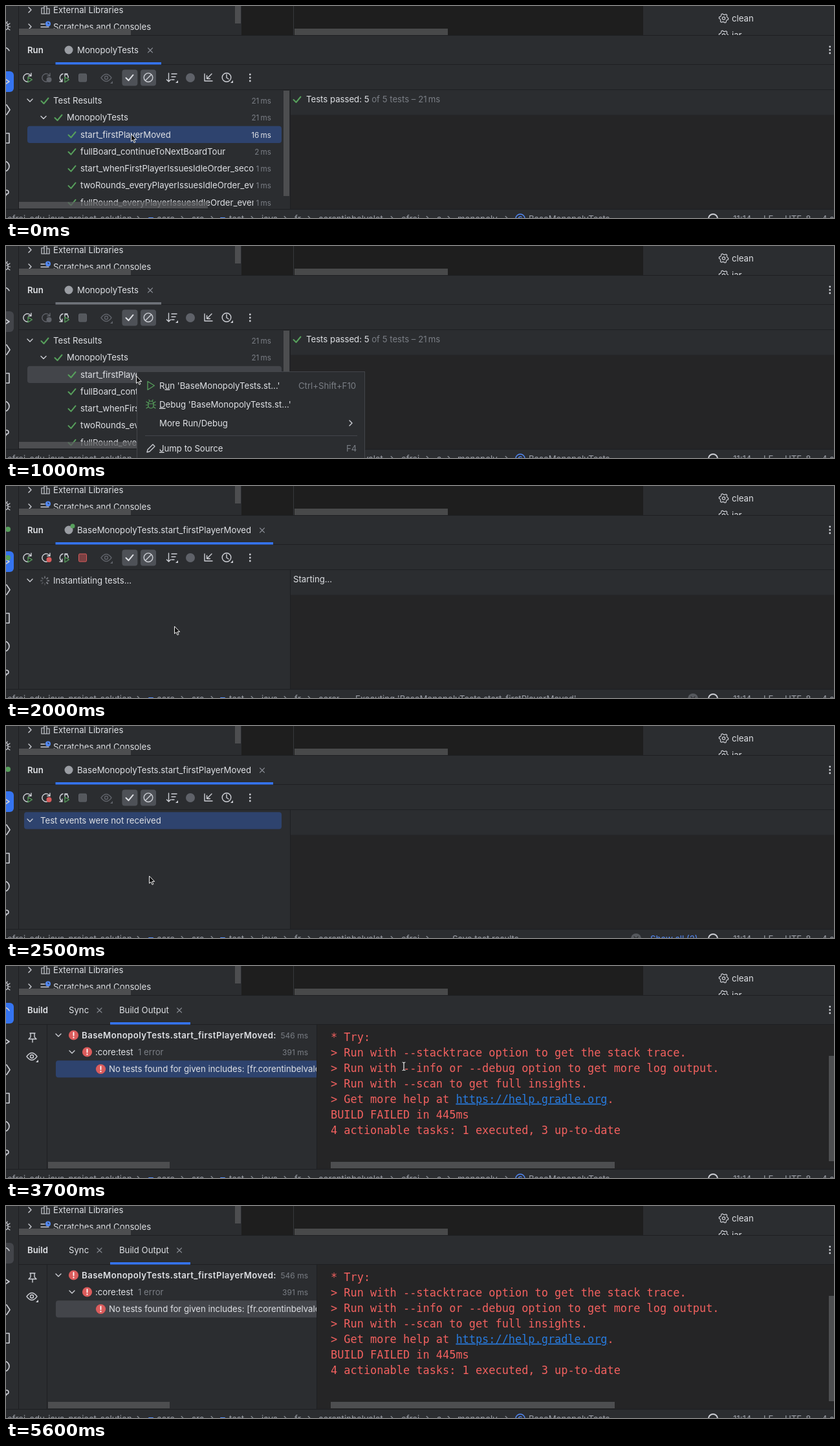
Recreate the animation shown at these times as an HTML page. Size 1280 px wide and 328 px high, loop 5700 ms.

```html
<!DOCTYPE html>
<html lang="en">
<head>
<meta charset="utf-8">
<title>Test run</title>
<style>
html, body { margin: 0; width: 100%; height: 100%; overflow: hidden; background: #2b2d30; }
svg { display: block; }
text { font: 13.18px Inter, Roboto, sans-serif; fill: #dfe1e5; white-space: pre; }
.bold { font-weight: 600; }
.wide { letter-spacing: .45px; }
.dim { fill: #7a7e85; }
.crumb { fill: #9da0a8; }
.time { font-size: 11.7px; word-spacing: -1px; text-anchor: end; }
.total { font-size: 12px; text-anchor: end; }
.log { font: 16.92px "DejaVu Sans Mono", "Noto Sans Mono", monospace; fill: #f2615f; }
.link { fill: #287bde; text-decoration: underline; }
.u { text-decoration: underline; }
</style>
</head>
<body>
<svg id="stage" width="1280" height="328" viewBox="0 0 1280 328"></svg>
<script>
const LOOP = 5700, STEP = 100;
const BG = '#2b2d30', DARK = '#1e1f22', EDITOR = '#1e1e1e', CONSOLE = '#252526', BAR = '#4d4e50';
const INK = '#ced0d6', DIM = '#5f6269', BLUE = '#3574f0', GREEN = '#57a05c', RED = '#db5c5c';
const SELECT = '#2e436e', MUTED = '#43454a';

// [time, x, y, shape]
const POINTER = [
  [0, 193, 198], [500, 194, 199], [600, 197, 200], [700, 200, 201], [800, 201, 201],
  [1200, 204, 203], [1300, 222, 208], [1400, 245, 214], [1500, 257, 217], [1600, 260, 217],
  [2200, 257, 219], [2300, 238, 228], [2400, 221, 232],
  [3300, 208, 221], [3400, 350, 200], [3500, 575, 172, 'beam'], [3600, 673, 161, 'beam'],
  [3700, 615, 155, 'beam'], [3800, 442, 140], [3900, 325, 119], [4000, 202, 95],
  [4100, 112, 75], [4200, 68, 64], [4300, 55, 61], [4600, 45, 24], [4700, 31, -11],
  [4900, 31, -12], [5000, 31, -40]
];

const rect = (x, y, w, h, fill, r = 0) => `<rect x="${x}" y="${y}" width="${w}" height="${h}" rx="${r}" fill="${fill}"/>`;
const path = (d, color = INK, w = 1.4, fill = 'none') =>
  `<path d="${d}" fill="${fill}" stroke="${color}" stroke-width="${w}" stroke-linecap="round" stroke-linejoin="round"/>`;
const dot = (x, y, r, fill) => `<circle cx="${x}" cy="${y}" r="${r}" fill="${fill}"/>`;
const ring = (x, y, r, color = INK, w = 1.4) => `<circle cx="${x}" cy="${y}" r="${r}" fill="none" stroke="${color}" stroke-width="${w}"/>`;
const text = (x, y, s, cls = '') => `<text x="${x}" y="${y + 4.7}" class="${cls}">${s}</text>`;
const clip = (x, y, w, h, body) => `<svg x="${x}" y="${y}" width="${w}" height="${h}" viewBox="${x} ${y} ${w} ${h}">${body}</svg>`;

const down = (x, y) => path(`M${x - 4} ${y - 2}l4 4 4-4`);
const right = (x, y, c = INK, s = 4) => path(`M${x - s / 2} ${y - s}l${s} ${s} ${-s} ${s}`, c);
const close = (x, y) => path(`M${x - 3.5} ${y - 3.5}l7 7m0-7l-7 7`, '#868a91', 1.1);
const check = (x, y, c = GREEN) => path(`M${x - 5.5} ${y + .5}l4 4 7-8.5`, c, 2);
const kebab = (x, y) => [-5, 0, 5].map(d => dot(x, y + d, 1.4, INK)).join('');
const corner = (x, y, c = INK) => `<path d="M${x} ${y}v-4l-4 4z" fill="${c}"/>`;
const play = (x, y, s, fill = 'none') => path(`M${x} ${y - s}l${s * 1.6} ${s}l${-s * 1.6} ${s}z`, GREEN, 1.3, fill);
const reload = (x, y, c = INK) => path(`M${x + 5.5} ${y - 3}a6.2 6.2 0 1 0-4 9M${x + 6} ${y - 7}v4.2h-4.2`, c);
const eye = (x, y, c) => path(`M${x - 8} ${y}q8-11 16 0q-8 11-16 0z`, c) + ring(x, y, 2.5, c) + corner(x + 10, y + 9, c);
const alert = (x, y) => dot(x, y, 7.6, RED) + path(`M${x} ${y - 4}v4.5`, '#fff', 1.8) + dot(x, y + 3.7, 1.1, '#fff');
const underline = (x, w, color) => rect(20, 90, 1260, 1, DARK) + rect(x, 87, w, 3.6, color);
const row = (x, y, w, color) => rect(x, y - 13.2, w, 26.2, color, 4);

function gear(x, y) {
  const pts = Array.from({ length: 24 }, (_, i) => {
    const a = i * Math.PI / 12, r = i % 4 < 2 ? 7.2 : 5.6;
    return (x + r * Math.cos(a)).toFixed(1) + ' ' + (y + r * Math.sin(a)).toFixed(1);
  });
  return path(`M${pts.join('L')}z`, INK, 1.2) + ring(x, y, 2.2, INK, 1.2);
}

function bug(x, y, c) {
  return path(`M${x - 4} ${y - 1}a4 4 0 0 1 8 0v3a4 4 0 0 1-8 0zM${x - 4} ${y - 1}h8` +
    `M${x - 4} ${y - 2}l-3-2M${x + 4} ${y - 2}l3-2M${x - 4} ${y + 1}h-3.5M${x + 4} ${y + 1}h3.5` +
    `M${x - 4} ${y + 4}l-3 2M${x + 4} ${y + 4}l3 2M${x - 2} ${y - 5}l-1-2M${x + 2} ${y - 5}l1-2`, c, 1.2);
}

function spinner(x, y, n) {
  let out = '';
  for (let i = 0; i < 8; i++) {
    const o = .25 + .6 * ((i - n % 8 + 8) % 8) / 7;
    out += `<path d="M0-3.5V-7" transform="translate(${x} ${y}) rotate(${i * 45})" stroke="#9da0a8" stroke-width="1.7" opacity="${o}"/>`;
  }
  return out;
}

function topStrip() {
  return rect(0, 0, 1280, 328, BG) +
    right(37, 6) + path('M55 12v-9h4v9zM59 12v-12h4v12zM63 12v-8h4v8z', INK, 1.2) + text(73, 6, 'External Libraries') +
    right(37, 32) + path('M54 28h6M54 32.500h12M54 37h12') + dot(65, 27.500, 4, '#548af7') +
    path('M65 25.500v2h1.500', BG, 1) + text(73, 32, 'Scratches and Consoles') +
    rect(354, 0, 9, 27, BAR) + rect(20, 35, 173, 10, BAR) +
    rect(364, 0, 621, 45, EDITOR) + rect(444, 0, 1, 45, '#36383c') + rect(446, 35, 237, 10, '#48494a') +
    gear(1109.5, 19) + text(1122, 19.5, 'clean') + gear(1109.5, 45) + text(1122, 45, 'jar') +
    rect(20, 45, 1260, 283, BG) + rect(20, 45, 1260, 1, DARK) + kebab(1273.7, 68);
}

function stripe(s) {
  const tile = s.focus ? BLUE : MUTED, y = s.build ? 57 : 101;
  const running = s.view === 'start';
  return rect(0, 0, 20, 328, BG) + rect(19, 0, 1, 328, DARK) + rect(-20, y, 32, 32, tile, 6) +
    bug(-1, 31, INK) + path('M-4 65q5-2 9 4', INK, 1.6) + path('M-4 111l9 6-9 6', INK, 1.6) +
    path('M-4 153h5l5 7.500-5 7.500h-5', INK, 1.6) + path('M-6 197h11v15h-11', INK, 1.6) +
    ring(-3, 248, 8, INK, 1.6) + ring(1, 288, 3, INK, 1.6) + path('M1 291q0 3-5 4', INK, 1.6) +
    (running || s.view === 'none' ? dot(3, 67, 4, GREEN) : '') + (running ? dot(3, 111, 4, GREEN) : '');
}

function toolbar(s) {
  const live = s.view === 'start', fresh = s.view !== 'old';
  return reload(33, 111) + play(34, 114, 4, BG) +
    reload(62, 111, fresh ? INK : DIM) + dot(66.500, 114, 4, fresh ? RED : DIM) +
    path('M88 105a6 6 0 0 0-3 10l2 2M83 117h4v-4M91 105q6 1 5 6M95 105h-4v4') + play(91, 114, 4, BG) +
    `<rect x="112.500" y="105" width="12" height="12" rx="1.500" fill="${live ? '#7a4042' : '#55585d'}" stroke="${live ? RED : DIM}"/>` +
    eye(155, 111, DIM) +
    rect(179.4, 98.4, 24, 25, '#4e5157', 4) + check(191, 110.7, '#dfe1e5') +
    rect(208, 98.4, 24, 25, '#4e5157', 4) + ring(220, 110.7, 6.8) + path('M224.500 106.200l-9 9') +
    path('M251.500 104v13M248.500 114l3 3 3-3M256 105h8M256 109.500h6M256 114h4') + corner(266, 119) +
    dot(285, 111, 7, DIM) +
    path('M307 105v11h12M318 105l-7.500 7.500M310.500 107.500v5h5') +
    ring(341, 110.500, 6.8) + path('M341 106v5l3 2') + corner(351, 119) + kebab(377.3, 111) +
    rect(20, 129, 1260, 1, DARK);
}

function tab(label, end, s) {
  return text(33, 68, 'Run', 'bold') + dot(97, 68, 6.5, '#9a9da3') + (s.view === 'start' ? dot(103, 62, 3.5, GREEN) : '') +
    text(110, 68, label) + close(end - 17, 68.5) + underline(76.5, end - 76.5, s.focus ? BLUE : '#6f737a');
}

function tests(s) {
  const rows = [
    ['start_firstPlayerMoved', 16], ['fullBoard_continueToNextBoardTour', 2],
    ['start_whenFirstPlayerIssuesIdleOrder_secondPlayerMoved', 1],
    ['twoRounds_everyPlayerIssuesIdleOrder_everyPlayerMoved', 1],
    ['fullRound_everyPlayerIssuesIdleOrder_everyPlayerMoved', 1]
  ];
  const list = rows.map(([name, ms], i) => {
    const y = 199 + i * 26.2;
    return check(102, y) + clip(110, y - 13, 272.5, 26, text(115, y, name)) +
      text(410, y, ms + ' ms', i ? 'time dim' : 'time');
  }).join('');
  return row(33, 199, 393, s.focus ? SELECT : MUTED) +
    down(37, 146) + check(60, 146.5) + text(73, 146.5, 'Test Results') + text(410, 146.5, '21 ms', 'time dim') +
    down(58, 172.5) + check(81, 172.5) + text(94, 172.5, 'MonopolyTests') + text(410, 172.5, '21 ms', 'time dim') +
    clip(20, 130, 419, 184, list) +
    rect(429, 131, 9, 163, BAR) + `<g opacity=".75">${rect(20, 303, 292, 10, '#595a5c')}</g>` +
    check(450, 144.5) + text(464, 144.5, 'Tests passed: 5 <tspan class="dim">of 5 tests – 21<tspan dx="-1.5"> ms</tspan></tspan>');
}

function runPanel(s, n) {
  const old = s.view === 'old';
  let out = tab(old ? 'MonopolyTests' : 'BaseMonopolyTests.start_firstPlayerMoved', old ? 240 : 413, s) +
    toolbar(s) + rect(439, 130, 1, 184, DARK) + rect(440, 168.5, 840, 145.5, CONSOLE);
  if (old) out += tests(s);
  else if (s.view === 'start')
    out += down(37, 146) + spinner(60, 146.5, n) + text(73, 146.5, 'Instantiating tests...') + text(444, 144.5, 'Starting...');
  else out += row(28, 146.5, 398, SELECT) + down(37, 146) + text(53, 146.5, 'Test events were not received');
  return out;
}

function buildPanel(s) {
  const log = [
    '* Try:',
    '&gt; Run with --stacktrace option to get the stack trace.',
    '&gt; Run with --info or --debug option to get more log output.',
    '&gt; Run with --scan to get full insights.',
    '&gt; Get more help at <tspan class="link">https://help.gradle.org</tspan>.',
    'BUILD FAILED in 445ms',
    '4 actionable tasks: 1 executed, 3 up-to-date'
  ];
  const fail = 'No tests found for given includes: [fr.corentinbelvalet.efrei.a.monopoly.BaseMonopolyTests]';
  return text(33, 68, 'Build', 'bold') + text(97, 68, 'Sync') + close(144.5, 68.5) +
    text(175, 68, 'Build Output') + close(268, 68.5) +
    underline(161, 124, BLUE) + rect(63, 91, 1, 223, DARK) +
    path('M37 104h8M38 104v6l-3 3h12l-3-3v-6M41 113v5') + eye(40, 140, INK) +
    rect(480, 91, 800, 223, CONSOLE) + rect(480, 91, 1, 223, DARK) +
    clip(64, 91, 416, 223,
      row(77, 159.5, 420, s.focus ? SELECT : MUTED) +
      down(81, 107) + alert(104.5, 107) + text(117, 107, 'BaseMonopolyTests.start_firstPlayerMoved:', 'bold wide') +
      down(102, 133) + alert(125.5, 133) + text(138, 133.5, ':core:test') + text(204, 133.5, '1 error', 'dim') +
      alert(146.5, 159.5) + text(159, 159.5, fail) +
      text(467, 107, '546 ms', 'total dim') + text(467, 133.5, '391 ms', 'total dim') +
      rect(65, 303, 188, 10, BAR)) +
    log.map((line, i) => text(502, 111 + i * 24, line, 'log')).join('') +
    rect(502, 303, 439, 10, BAR) + rect(1272, 139, 8, 163, BAR);
}

function status(job) {
  const crumbs = [[2, 'efrei-edu-java-project-solution'], [233, 'core'], [287, 'src'], [345, 'test'], [395, 'java'],
    [446, 'fr'], [483, 'corentinbelvalet'], [611, 'efrei'], [666, 'a'], [698, 'monopoly'], [808, 'BaseMonopolyTests']];
  const arrows = [205, 273, 319, 381, 432, 469, 597, 652, 685, 774];
  const trail = crumbs.map(([x, s]) => text(x, 329, s, 'crumb')).join('') +
    arrows.map(x => right(x, 329, '#868a91', 3.5)).join('') +
    [224, 335].map(x => rect(x - 4, 327, 8, 6, '#548af7', 1)).join('') +
    ring(795, 329, 7, '#548af7') + path('M797 326.500a3 3 0 1 0 0 5', '#548af7');
  const stop = x => dot(x, 329, 8, '#55585d') + path(`M${x - 3} 326l6 6m0-6l-6 6`, BG);
  const limit = job === 'exec' ? 515 : job === 'save' ? 656 : 1060;
  let out = rect(0, 314, 1280, 14, BG) + rect(0, 314, 1280, 1, DARK) + clip(0, 314, limit, 14, trail);
  if (job === 'exec') out += text(540, 329, "Executing 'BaseMonopolyTests.start_firstPlayerMoved'", 'crumb') + stop(1062);
  if (job === 'save') out += text(690, 329, 'Save test results', 'crumb') + stop(974) +
    text(996, 329, '<tspan fill="#548af7">Show all (2)</tspan>');
  return out + ring(1093, 329, 7, INK, 2) + text(1124, 329, '11:14', 'crumb') + text(1171, 329, 'LF', 'crumb') +
    text(1204, 329, 'UTF-8', 'crumb') + text(1261, 329, '4 spaces', 'crumb');
}

function menu(hover) {
  const u = c => `<tspan class="u">${c}</tspan>`;
  return `<rect x="202.500" y="194.500" width="352" height="150" fill="${BG}" stroke="${MUTED}"/>` +
    (hover ? rect(208, 202, 341, 27, SELECT, 4) : '') +
    play(219, 216, 6.5) + text(237, 216, `R${u('u')}n 'BaseMonopolyTests.st...'`) +
    text(452, 216, hover ? '<tspan fill="#a8adb5">Ctrl+Shift+F10</tspan>' : 'Ctrl+Shift+F10', 'dim') +
    bug(224, 245, GREEN) + text(237, 245, `${u('D')}ebug 'BaseMonopolyTests.st...'`) +
    text(237, 274, 'More Run/Debug') + right(533, 274) + rect(215, 293, 328, 1, MUTED) +
    path('M218 319l1-4 8-8 3 3-8 8z', INK, 1.3) + text(237, 313, `${u('J')}ump to Source`) + text(526, 313, 'F4', 'dim');
}

function pointer(x, y, shape) {
  if (shape === 'beam') return path(`M${x - 2} ${y - 6}q2 0 2 1.500q0-1.500 2-1.500M${x} ${y - 5}v10.500M${x - 2} ${y + 6.5}q2 0 2-1.500q0 1.500 2 1.500`, '#f0f0f0', 1.2);
  return path(`M${x + .5} ${y + .5}v11l2.600-2.300 1.900 4.300 1.900-.9-1.900-4h3.300z`, '#f0f0f0', 1, '#111');
}

function stateAt(t) {
  const build = t >= 2800, inMenu = t >= 1000 && t < 1900;
  return {
    build,
    menu: inMenu,
    focus: !inMenu && t < 5600,
    view: build ? 'done' : t < 2000 ? 'old' : t < 2500 ? 'start' : 'none',
    job: t < 2000 || t >= 2900 ? '' : t < 2500 ? 'exec' : 'save'
  };
}

function scene(t) {
  const s = stateAt(t);
  const [, x, y, shape] = POINTER.filter(p => p[0] <= t).pop();
  return topStrip() + stripe(s) + (s.build ? buildPanel(s) : runPanel(s, t / STEP)) + status(s.job) +
    (s.menu ? menu(x >= 208 && y >= 202) : '') + pointer(x, y, shape);
}

const stage = document.getElementById('stage');
const start = performance.now();
let shown = -1;

function tick() {
  const t = Math.floor((performance.now() - start) % LOOP / STEP) * STEP;
  if (t !== shown) stage.innerHTML = scene(shown = t);
  requestAnimationFrame(tick);
}
tick();
</script>
</body>
</html>
```
